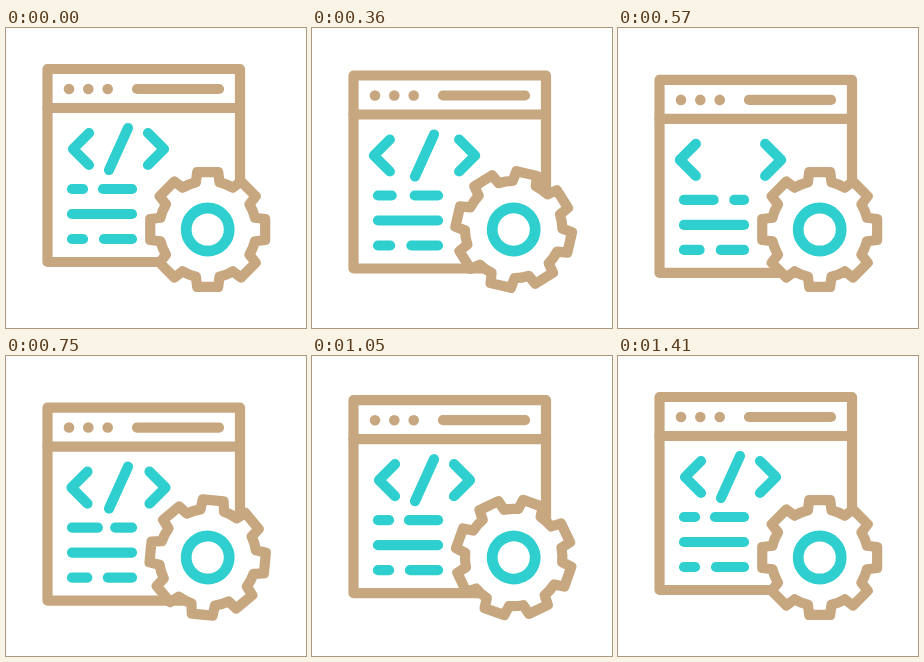
These frames come from a looping animation (300x300 px, 1.5 s). An HTML page with a canvas:

```html
<!DOCTYPE html>
<html lang="en">
<head>
<meta charset="utf-8">
<title>Code window and gear</title>
<style>
html, body { margin: 0; width: 100%; height: 100%; overflow: hidden; background: #fff; }
canvas { display: block; width: 100vw; height: 100vh; }
</style>
</head>
<body>
<canvas id="stage" width="300" height="300"></canvas>
<script>
const ctx = document.getElementById('stage').getContext('2d');
const TAN = '#c7a77f';
const TEAL = '#30cfcf';
const LOOP = 1500;
const STEP = 30;
const MOVE_END = 1410;

// Time in ms and gear angle in degrees
const TURN = [[30, 0], [360, -32], [570, -90], [750, -129.5], [930, -173.5], [1170, -234.5], [1410, -270]];

// Smooth rise and fall around a centre time
function hump(t, centre, half, height) {
  const d = Math.min(1, Math.abs(t - centre) / half);
  return height * (1 + Math.cos(Math.PI * d)) / 2;
}

function slope(i) {
  if (i === 0 || i === TURN.length - 1) return 0;
  const [a, b] = [TURN[i - 1], TURN[i + 1]];
  return (b[1] - a[1]) / (b[0] - a[0]);
}

function gearAngle(t) {
  if (t <= TURN[0][0]) return 0;
  let i = 0;
  while (i < TURN.length - 2 && t > TURN[i + 1][0]) i++;
  const [t0, a0] = TURN[i];
  const [t1, a1] = TURN[i + 1];
  const span = t1 - t0;
  const u = Math.min(1, (t - t0) / span);
  const v = 1 - u;
  return a0 * (1 + 2 * u) * v * v + a1 * u * u * (3 - 2 * u)
    + span * u * v * (slope(i) * v - slope(i + 1) * u);
}

function line(color, ...points) {
  ctx.strokeStyle = color;
  ctx.beginPath();
  points.forEach(([x, y]) => ctx.lineTo(x, y));
  ctx.stroke();
}

function dash(color, x1, x2, y) {
  line(color, [x1, y], [x2, y]);
}

function drawWindow(t) {
  ctx.strokeStyle = TAN;
  ctx.strokeRect(41.5, 41, 192.5, 193);
  dash(TAN, 41.5, 234, 80);
  dash(TAN, 131, 213, 61);
  ctx.fillStyle = TAN;
  for (const x of [63, 82.3, 101.7]) {
    ctx.beginPath();
    ctx.arc(x, 61, 5.3, 0, 2 * Math.PI);
    ctx.fill();
  }

  const spread = hump(t, 465, 428, 6);
  line(TEAL, [83 - spread, 105], [67 - spread, 121], [83 - spread, 137]);
  line(TEAL, [142 + spread, 105], [158 + spread, 121], [142 + spread, 137]);
  if (t < 465 || t >= 660) line(TEAL, [122, 100], [103, 142]);

  dash(TEAL, 66, 77 + hump(t, 630, 355, 20), 161);
  dash(TEAL, 97 + hump(t, 595, 370, 19.5), 126, 161);
  dash(TEAL, 66, 126, 186);
  dash(TEAL, 66, 77 + hump(t, 650, 420, 5), 211);
  dash(TEAL, 98 + hump(t, 620, 400, 5), 126, 211);
}

function drawGear(t) {
  const teeth = 8;
  const pitch = 2 * Math.PI / teeth;
  const root = 48.7;
  const tip = 58.4;
  const rootHalf = 0.245;
  const tipHalf = 0.18;
  ctx.save();
  ctx.translate(201.7, 201.5);
  ctx.rotate(gearAngle(t) * Math.PI / 180);
  ctx.beginPath();
  for (let i = 0; i < teeth; i++) {
    const a = i * pitch;
    for (const side of [-tipHalf, tipHalf]) {
      ctx.lineTo(tip * Math.cos(a + side), tip * Math.sin(a + side));
    }
    ctx.arc(0, 0, root, a + rootHalf, a + pitch - rootHalf);
  }
  ctx.closePath();
  ctx.fillStyle = '#fff';
  ctx.fill();
  ctx.strokeStyle = TAN;
  ctx.stroke();
  ctx.beginPath();
  ctx.arc(0, 0, 21.5, 0, 2 * Math.PI);
  ctx.strokeStyle = TEAL;
  ctx.lineWidth = 10.8;
  ctx.stroke();
  ctx.restore();
}

function draw(now) {
  const t = Math.min(MOVE_END, Math.floor((now % LOOP) / STEP) * STEP);
  ctx.fillStyle = '#fff';
  ctx.fillRect(0, 0, 300, 300);
  ctx.lineWidth = 10.2;
  ctx.lineCap = ctx.lineJoin = 'round';
  ctx.save();
  ctx.translate(0, hump(t, 645, 630, 11.3));
  drawWindow(t);
  ctx.restore();
  drawGear(t);
}

const start = performance.now();
function tick() {
  draw(performance.now() - start);
  requestAnimationFrame(tick);
}
tick();
</script>
</body>
</html>
```
